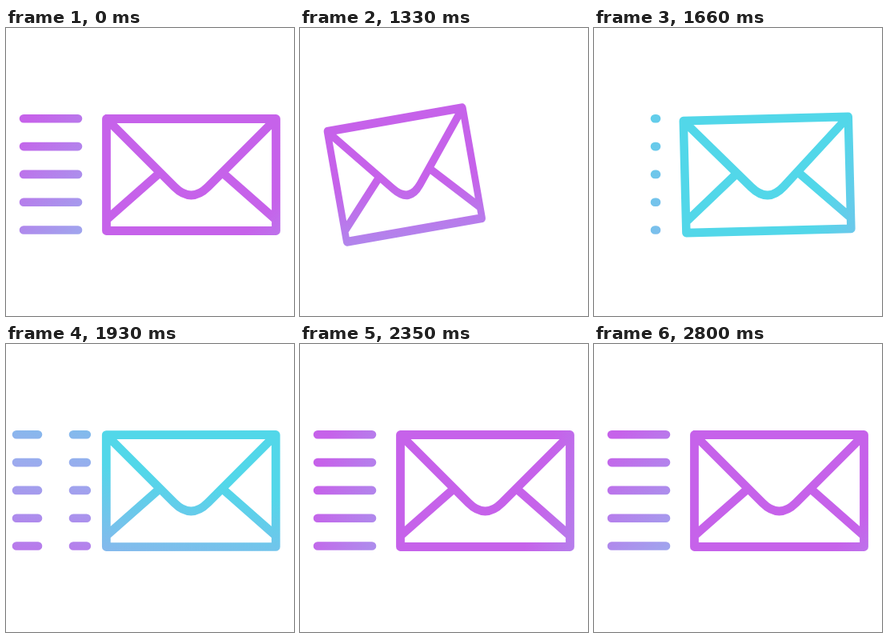
Recreate the animation shown at these times as an HTML page with a canvas. Size 360 by 360 pixels, loop 2.83 s.

```html
<!DOCTYPE html>
<html lang="en">
<head>
<meta charset="utf-8">
<title>Sending mail</title>
<style>
  html, body { margin: 0; width: 100%; height: 100%; overflow: hidden; background: #fff; }
  canvas { display: block; width: 360px; height: 360px; }
</style>
</head>
<body>
<canvas id="stage"></canvas>
<script>
const LOOP = 2830, REST = 1030, STEP = 30, RELEASE = 1540;
const DASH = 68, PERIOD = 112, LEFT = 13, RIGHT = 101;

const canvas = document.getElementById('stage');
const ctx = canvas.getContext('2d');
const ratio = window.devicePixelRatio || 1;
canvas.width = canvas.height = 360 * ratio;

// [time, value] pairs
const ANGLE = [[1000, 42], [1030, 45], [1330, 95], [1660, 200], [2200, 362], [2500, 388], [2800, 402]];
const HEAD = [[1540, 116], [1660, 76], [2200, -132], [2500, -272], [2800, -426]];

function track(keys, t) {
  if (t <= keys[0][0]) return keys[0][1];
  for (let i = 1; i < keys.length; i++) {
    const [t0, v0] = keys[i - 1], [t1, v1] = keys[i];
    if (t <= t1) return v0 + (v1 - v0) * (t - t0) / (t1 - t0);
  }
  return keys[keys.length - 1][1];
}

// 0 = at rest, 1 = fully drawn back
function pullAt(t) {
  if (t < REST) return 0;
  if (t < RELEASE) return 1 - Math.pow(0.59, (t - 1000) / STEP);
  return Math.pow(0.62, (t - RELEASE) / STEP);
}

function gradientAt(t) {
  const a = track(ANGLE, t) * Math.PI / 180;
  const dx = 155 * Math.cos(a), dy = 155 * Math.sin(a);
  const g = ctx.createLinearGradient(180 - dx, 180 - dy, 180 + dx, 180 + dy);
  g.addColorStop(0, '#c662ea');
  g.addColorStop(0.5, '#9cabee');
  g.addColorStop(1, '#52d7e9');
  return g;
}

function envelopePath() {
  const p = new Path2D();
  p.rect(-106, -70, 212, 140);
  p.moveTo(-106, -70);
  p.lineTo(-21, 15);
  p.quadraticCurveTo(0, 36, 21, 15);
  p.lineTo(106, -70);
  for (const side of [-1, 1]) {
    p.moveTo(side * 41, -1);
    p.lineTo(side * 104, 54.5);
  }
  return p;
}
const envelope = envelopePath();

function drawEnvelope(cx, pull) {
  ctx.save();
  ctx.translate(cx, 183.5);
  ctx.rotate(-10 * pull * Math.PI / 180);
  ctx.scale(1 - 0.19 * pull, 1);
  ctx.lineWidth = 10.8;
  ctx.stroke(envelope);
  ctx.restore();
}

function drawDash(from, to, limit) {
  const a = Math.max(from, LEFT), b = Math.min(to, limit);
  if (b <= a) return;
  ctx.beginPath();
  for (let i = 0; i < 5; i++) {
    const y = 113.3 + 34.8 * i;
    ctx.moveTo(a, y);
    ctx.lineTo(b, y);
  }
  ctx.stroke();
}

function drawLines(t, cx, pull) {
  ctx.lineWidth = 10.6;
  const edge = cx - 106 * (1 - 0.19 * pull) - 35.5;
  if (t < RELEASE) {
    drawDash(22, 22 + DASH, edge);
    return;
  }
  const settle = Math.min(1, Math.max(0, (t - 1660) / 200));
  const limit = edge + (RIGHT - 90) * settle;
  for (let x = track(HEAD, t); x < limit; x += PERIOD) drawDash(x, x + DASH, limit);
}

function render(now) {
  const raw = now % LOOP;
  const t = raw < REST ? 0 : REST + Math.floor((raw - REST) / STEP) * STEP;
  const pull = pullAt(t);
  const cx = 231.5 - 101 * pull;

  ctx.setTransform(ratio, 0, 0, ratio, 0, 0);
  ctx.fillStyle = '#fff';
  ctx.fillRect(0, 0, 360, 360);
  ctx.strokeStyle = gradientAt(t);
  ctx.lineCap = ctx.lineJoin = 'round';
  drawLines(t, cx, pull);
  drawEnvelope(cx, pull);
}

const start = performance.now();
function tick() {
  render(performance.now() - start);
  requestAnimationFrame(tick);
}
tick();
</script>
</body>
</html>
```
